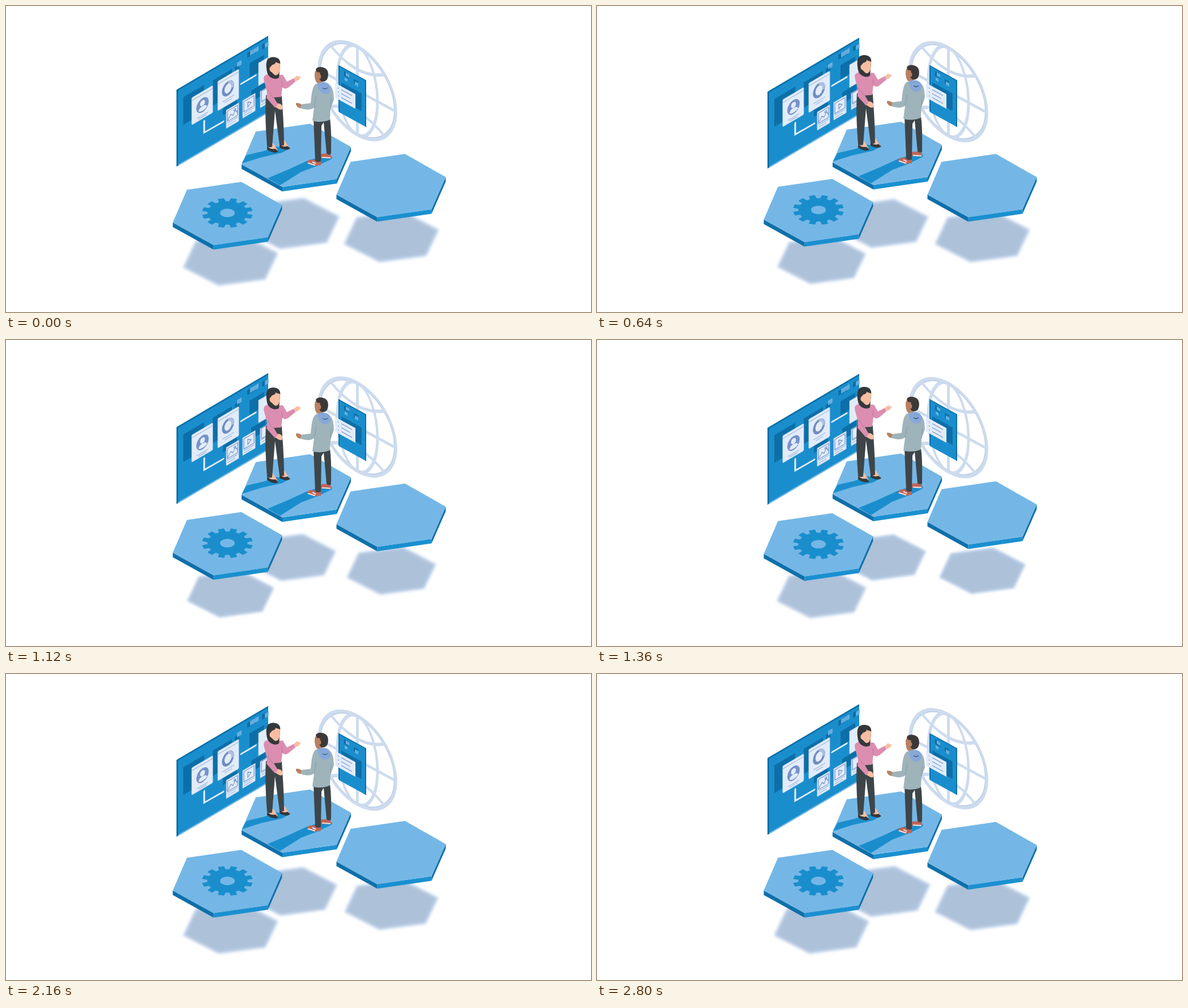
Animation of 1033 by 542 pixels, one loop 2.88 s. Source, as an HTML page:

```html
<!DOCTYPE html>
<html lang="en">
<head>
<meta charset="utf-8">
<title>Floating platforms</title>
<style>
html, body { margin: 0; width: 100%; height: 100%; overflow: hidden; background: #fff; }
svg { display: block; width: 100%; height: 100%; }
.blue { fill: #1a8ecd; }
.dark { fill: #0d6fa8; }
.sky { fill: #74b7e6; }
.paper { fill: #e2ecf9; }
.line { fill: none; stroke: #6f8fc6; stroke-width: 1.2; }
.link { fill: none; stroke: #e7effa; stroke-width: 3; stroke-linecap: round; }
.skin { fill: #f9bea2; }
.tan { fill: #b98062; }
.ink { fill: #34383b; }
.cloth { fill: #3d4549; }
.rose { fill: #dc8eb0; }
.grey { fill: #9fb3bb; }
.red { fill: #bd6558; }
</style>
</head>
<body>
<svg viewBox="0 0 1033 542" preserveAspectRatio="none">
  <defs>
    <filter id="soft" x="-20%" y="-20%" width="140%" height="140%"><feGaussianBlur stdDeviation="2.6"/></filter>
    <clipPath id="top"><path d="M441 222 537 208 609 249 584 306 488 320 416 280Z"/></clipPath>
  </defs>

  <g id="wall">
    <g transform="matrix(1 -.59 0 1 302 148)">
      <path class="blue" d="M0 0H161V135H0Z"/>
      <path class="sky" d="M2 134H161V136.5H2Z"/>
      <path class="dark" d="M-1 0H161V3H2V136H-1ZM11 20h37v49H11ZM63 21h34v45H63ZM128 29h26v25H128ZM81 71h25v22H81ZM102 20h8v10h-8ZM131 79h25v20h-25ZM124 8h16v9h-16ZM150 9h9v9h-9Z"/>
      <path class="sky" d="M106 15h8v8h-8ZM129 8h15v8h-15ZM155 10h7v8h-7Z" opacity=".85"/>
      <path class="link" d="M48 84V104.500L82 105M113 56.700H139"/>
      <g class="paper" stroke="#c6d8ef" stroke-width=".7">
        <rect x="26" y="30" width="37" height="48" rx="1.500"/>
        <rect x="72" y="28" width="37" height="52" rx="1.500"/>
        <rect x="144" y="38" width="16" height="40"/>
        <rect x="87" y="88" width="22" height="32"/>
        <rect x="116" y="88" width="22" height="31"/>
        <rect x="147" y="90" width="13" height="29"/>
      </g>
      <path class="line" opacity=".65" d="M26 35H63M72 33H109M35 72H55M38 75H52M80 69H101M84 73H97M89 112H107M89 116H103M118 112H136M118 116H132M149 111H160M149 115H160"/>
      <ellipse cx="45" cy="54" rx="11" ry="12.500" fill="#7693c8"/>
      <path class="paper" d="M38 61C39 56 43 56 45 56S52 56 53 61C49 65 41 65 38 61Z"/>
      <ellipse class="paper" cx="45" cy="50.500" rx="4.300" ry="5"/>
      <ellipse cx="90" cy="51" rx="8.500" ry="10.500" fill="none" stroke="#708dc1" stroke-width="4.500"/>
      <path d="M90 40.500A8.500 10.500 0 0 1 98 54" fill="none" stroke="#aebfe0" stroke-width="4"/>
      <path class="line" d="M89 91h18v18H89ZM90 107l5-7 4 4 4-7 4 7M118 91h18v18H118ZM125 96l6 4-6 5ZM149 91h11v18H149Z"/>
      <circle class="line" cx="102" cy="96" r="1.600"/>
    </g>
  </g>

  <g id="globe">
    <g transform="matrix(.866 .47 0 1 620.500 150)" fill="none">
      <circle r="77.500" stroke="#b9cce5" stroke-width="6"/>
      <g stroke="#cddbee" stroke-width="5.400">
        <circle r="78.500"/>
        <ellipse rx="41" ry="78"/>
        <path d="M0-78V78M-78 0H78M-56-55Q0-20 56-55M-56 55Q0 20 56 55"/>
      </g>
    </g>
  </g>

  <g transform="matrix(1 .55 0 1 588 106)">
    <path class="blue" d="M0 0H48V82H0Z"/>
    <path class="dark" d="M-1-1H48V1H1V81H-1ZM46 0h2v82h-2ZM4 27H40V58H4ZM9 4h9v9H9ZM26 9h8v8h-8Z"/>
    <path class="sky" d="M12 5h6v6h-6ZM10 15h5v5h-5ZM28 12h6v6h-6Z" opacity=".85"/>
    <path class="paper" d="M-7 34H29V60H-7Z"/>
    <path class="line" d="M4 40H23M4 47H20M4 54H23"/>
    <path class="line" stroke-width="2" d="M-2 40H0M-2 47H0M-2 54H0"/>
  </g>

  <g id="shades"></g>
  <g id="right"></g>

  <g id="center">
    <g id="deck"></g>
    <path class="blue" clip-path="url(#top)" d="M414 282 425 264 455 257 478 249 500 253 487 260 451 268 416 279ZM462 305 500 289 530 275 545 270 576 267 575 271 550 283 521 294 483 318Z"/>

    <g id="woman">
      <path class="skin" d="M464 243h8l8 13-14 0ZM485 238h7l8 13-14-1Z"/>
      <path class="ink" d="M461 248C465 253 471 254 476 253L481 258C475 262 466 258 461 254ZM483 245C487 249 493 250 497 248L502 252C497 257 489 254 483 251Z"/>
      <path class="cloth" d="M459 158 487 159C488 179 491 210 491 246Q487 249 483 246L475 185 470 249Q465 252 461 248C459 220 457 190 459 158Z"/>
      <path class="skin" d="M476 172C482 172 488 174 488 178L488 183C483 185 480 181 476 179ZM507 129 514 123 517 125 520 125C520 130 514 134 509 133Z"/>
      <path class="rose" d="M463 121C455 122 454 127 456 134L461 152 460 163 475 180 480 174 473 162 486 161 488 144C493 148 496 146 499 144L511 134 508 128 496 134 489 122Z"/>
      <path fill="none" stroke="#c0749b" d="M462 149 472 163M488 144 487 133"/>
      <path class="ink" d="M461 117C459 105 458 93 468 91C478 89 486 94 484 104L482 127C475 132 463 127 461 117Z"/>
      <path class="skin" d="M468 107C470 102 476 105 476 99 480 102 482 100 484 103L483 114C482 121 478 124 474 122L469 117C465 116 464 109 468 107Z"/>
    </g>

    <g id="man">
      <path class="tan" d="M512 172C516 171 521 173 523 176L521 181C516 181 514 178 512 175ZM546 115 557 112 559 139 551 137C545 135 544 121 546 115Z"/>
      <path class="red" d="M533 274C540 270 547 273 556 275L556 282 543 283 532 278ZM556 262 567 261 574 264 574 270 555 269Z"/>
      <path d="M533 278 546 282M558 268 573 269M541 276l6 3" stroke="#f3e2df" stroke-width="2"/>
      <path class="cloth" d="M543 200 572 199C575 220 574 246 574 262Q570 265 566 261L561 206 557 212 556 275Q550 278 546 274Z"/>
      <path class="grey" d="M550 137C541 139 540 153 538 172L522 174 520 181C529 184 538 185 544 180L541 203C551 207 565 205 572 201L573 182 579 166C579 147 575 139 563 137Z"/>
      <path d="M544 180 548 160M573 182 574 163" stroke="#869da7" fill="none"/>
      <path fill="#85a8d9" d="M551 137C558 133 570 134 573 143C575 154 565 158 558 154Q550 148 551 137Z"/>
      <path d="M559 145 563 147 568 145" stroke="#3f5475" stroke-width="1.300" fill="none"/>
      <path fill="#3c3837" d="M547 113C548 107 558 107 563 110C570 113 570 124 567 130C563 135 558 135 555 132L552 127 555 118 549 117Z"/>
      <ellipse class="tan" cx="554" cy="125" rx="2.300" ry="4"/>
    </g>
  </g>

  <g id="left"></g>
</svg>
<script>
const LOOP = 2880, FRAME = 80;
const $ = id => document.getElementById(id);
const hex = [[-71.5, -42.5], [24.500, -56.5], [96.500, -15.5], [71.500, 41.500], [-24.5, 55.500], [-96.5, 15.500]];
const join = pts => pts.map(p => p.join()).join(" ");
const poly = (pts, fill) => `<polygon points="${join(pts)}" fill="${fill}"/>`;

function platform(x, y) {
  const p = hex.map(([a, b]) => [x + a, y + b]);
  const side = (i, j, fill) =>
    poly([p[i], p[j], [p[j][0], p[j][1] + 8], [p[i][0], p[i][1] + 8]], fill);
  return side(5, 4, "#0f70aa") + side(4, 3, "#1a90d0") + side(3, 2, "#0f70aa") + poly(p, "#74b7e6");
}

function gear(x, y) {
  const pts = [];
  for (let i = 0; i < 12; i++) {
    const mid = (i + .5) * Math.PI / 6;
    for (const [d, r] of [[-.17, 35.5], [-.125, 45], [.125, 45], [.17, 35.5]]) {
      const a = mid + d;
      pts.push([(x + r * Math.cos(a)).toFixed(1), (y + .585 * r * Math.sin(a)).toFixed(1)]);
    }
  }
  return poly(pts, "#1a8ecd") + `<ellipse cx="${x}" cy="${y}" rx="13" ry="7.500" class="sky"/>`;
}

$("deck").innerHTML = platform(512.5, 265);
$("right").innerHTML = platform(680, 318.5);
$("left").innerHTML = platform(391, 368) + gear(391, 366.5);

const spots = { center: [505, 385.5], right: [680.5, 409], left: [396.5, 450.5] };
const shape = join(hex.map(([x, y]) => [x * .845, y * .775]));
$("shades").innerHTML = Object.keys(spots).map(k =>
  `<g id="shade-${k}" filter="url(#soft)"><polygon points="${shape}" fill="#adc1d8" stroke="#b9cee8" stroke-width="4" stroke-linejoin="round"/></g>`
).join("");

// [time, vertical offset]
const tracks = {
  wall: [[0, 0], [1440, 7.5], [LOOP, 0]],
  globe: [[0, 0], [320, .4], [880, 3], [1400, 5.500], [1760, 4.500], [2160, 2.500], [2720, 0], [LOOP, 0]],
  center: [[0, 0], [1440, -8], [LOOP, 0]],
  right: [[0, 0], [640, 0], [1440, -13], [2280, 0], [LOOP, 0]],
  left: [[0, 0], [960, -8], [1920, 0], [LOOP, 0]]
};
const peak = { center: 8, right: 13, left: 8 };

function at(track, t) {
  const i = track.findIndex(k => k[0] > t);
  const [t0, a] = track[i - 1], [t1, b] = track[i];
  return a + (b - a) * (t - t0) / (t1 - t0);
}

function draw(now) {
  const t = Math.floor(now % LOOP / FRAME) * FRAME;
  for (const id in tracks) {
    const y = at(tracks[id], t);
    $(id).setAttribute("transform", `translate(0 ${y})`);
    if (spots[id]) {
      const s = 1 + .1 * y / peak[id];
      $("shade-" + id).setAttribute("transform", `translate(${spots[id]}) scale(${s})`);
    }
  }
}

let start;
function tick(now) {
  start ??= now;
  draw(now - start);
  requestAnimationFrame(tick);
}
draw(0);
requestAnimationFrame(tick);
</script>
</body>
</html>
```
